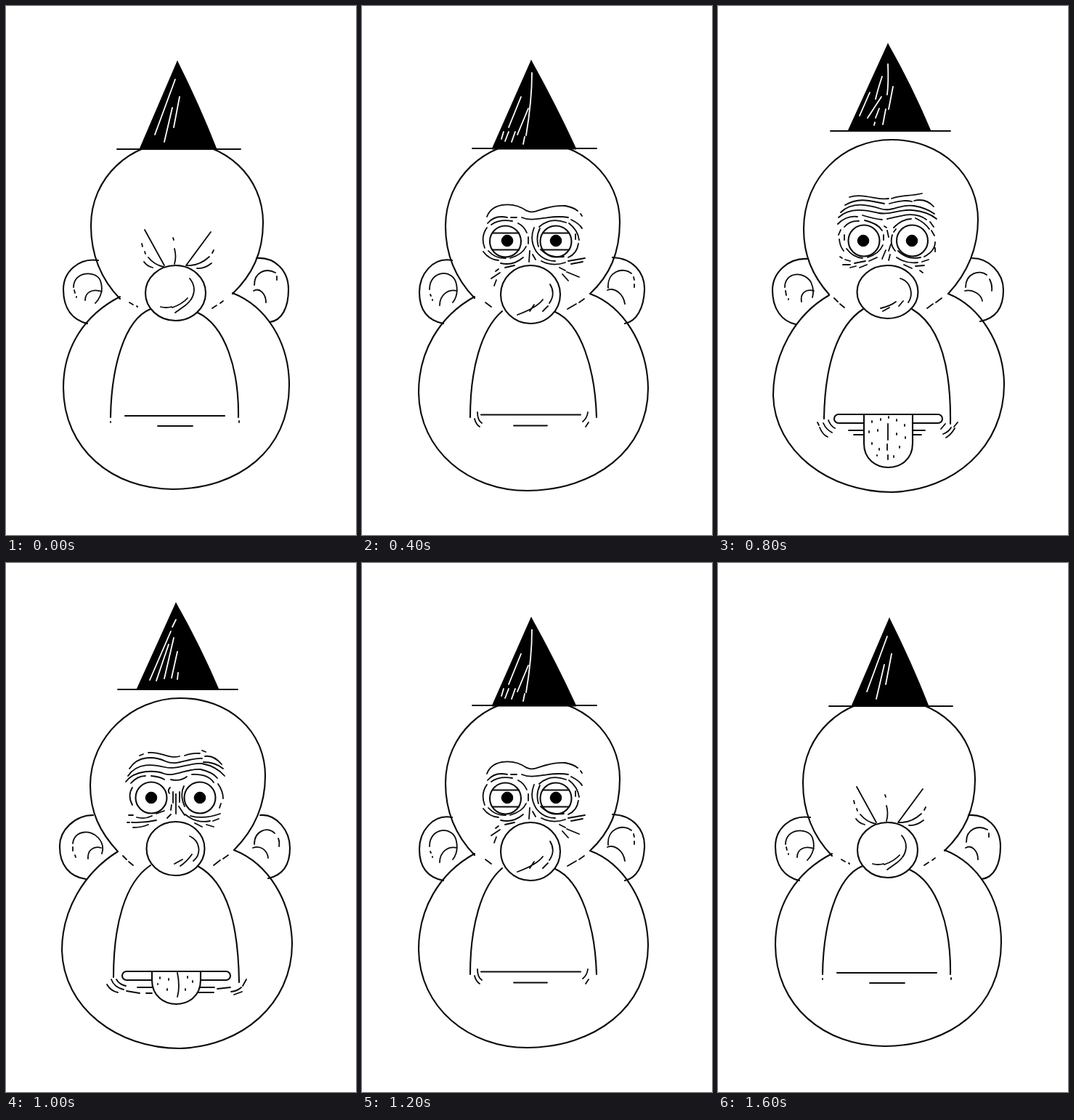
An HTML page for the animation above (1.9 s loop, 482 by 728 pixels).

```html
<!DOCTYPE html>
<html lang="en">
<head>
<meta charset="utf-8">
<title>Party hat</title>
<style>
  html, body { margin: 0; width: 100%; height: 100%; overflow: hidden; background: #fff; }
  svg { display: block; width: 482px; height: 728px; }
  path { fill: none; stroke: #0a0a0a; stroke-width: 2.1; stroke-linecap: round; stroke-linejoin: round; }
  .fine { stroke-width: 1.8; }
  .ink { fill: #000; stroke: #000; stroke-width: 1; }
  .skin { fill: #fff; }
  .shine { stroke: #fff; stroke-width: 1.8; }
</style>
</head>
<body>
<svg id="stage" viewBox="0 0 482 728"></svg>
<script>
const oval = (x, y, rx, ry = rx) =>
  `M${x - rx} ${y}a${rx} ${ry} 0 1 0 ${2 * rx} 0a${rx} ${ry} 0 1 0 ${-2 * rx} 0`;

// Outlines share one structure per part, so neighbouring poses can be blended.
const poses = [
  {
    hat: 'M236 76L184 197L290 197Q267 138 236 76',
    brim: 'M153 197L323 197',
    head: 'M157 403C128 373 117 338 117 302C117 237 170 187 236 187C302 187 354 235 354 298C354 340 339 370 312 396',
    body: 'M157 400C108 425 79 470 79 525C79 610 147 665 230 665C320 664 390 612 390 522C390 462 358 413 312 395',
    ears: 'M127 350C100 346 79 366 79 390C79 417 92 432 112 437M345 347C370 345 389 364 389 390C389 415 380 433 363 435',
    jaw: 'M199 417C162 432 145 500 144 566M264 422C302 440 321 500 320 566',
    nose: oval(233.5, 395, 41.5, 38),
    eyes: oval(197.5, 324, 21.5) + oval(267, 324, 21.5)
  },
  {
    hat: 'M233 75L179 197L295 197Q267 136 233 75',
    brim: 'M152 196L323 196',
    head: 'M155 402C127 373 115 338 115 303C115 238 168 187 235 187C303 187 355 235 355 297C355 340 341 371 314 396',
    body: 'M155 400C106 427 78 476 78 532C79 612 147 667 228 667C320 666 394 612 394 526C393 466 360 413 314 396',
    ears: 'M124 350C97 345 79 370 79 394C79 420 92 433 112 437M345 346C372 347 390 366 389 391C388 416 378 434 362 437',
    jaw: 'M193 420C164 445 149 500 149 566M266 421C302 437 321 500 323 566',
    nose: oval(232, 397, 41, 40),
    eyes: oval(197.5, 324, 21.5) + oval(267, 324, 21.5)
  },
  {
    hat: 'M234 55L180 174L293 174Q267 113 234 55',
    brim: 'M154 174L319 174',
    head: 'M154 397C129 370 116 343 116 306C116 240 173 186 240 186C307 186 357 231 357 293C357 336 341 368 314 395',
    body: 'M154 397C106 427 77 479 77 533C79 612 153 668 239 668C324 666 394 607 394 524C393 466 362 414 314 395',
    ears: 'M120 347C95 347 73 368 74 391C74 416 88 432 110 435M350 347C373 345 391 369 391 392C391 416 380 430 361 434',
    jaw: 'M199 416C163 440 148 500 148 570M264 417C306 440 320 500 321 577',
    nose: oval(233.5, 393, 40, 37),
    eyes: oval(200, 323, 21.5) + oval(267, 323, 21.5)
  },
  {
    hat: 'M234 52L179 172L293 172Q267 110 234 52',
    brim: 'M155 172L320 172',
    head: 'M153 397C130 371 118 343 118 307C118 238 171 184 239 184C307 184 358 232 358 294C358 337 342 369 317 396',
    body: 'M153 398C106 425 76 479 76 536C78 613 153 669 239 669C324 667 395 607 394 519C393 466 362 414 317 396',
    ears: 'M124 348C97 346 75 367 75 391C75 417 88 434 107 438M350 347C373 347 393 367 393 391C393 416 382 430 361 434',
    jaw: 'M200 417C164 440 147 496 146 568M267 417C308 441 321 504 320 575',
    nose: oval(233.5, 393.5, 42, 36.5),
    eyes: oval(201, 323, 21.5) + oval(267.5, 323, 21.5)
  }
];

// Hand-drawn marks, switched rather than blended.
const shine = [
  'M233 101L205 177M239 125L231 167M229 140L218 187',
  'M234 92Q234 130 226 178M219 125L202 167M229 141L214 177M195 173L192 183M202 173L197 186M211 173L206 187M224 180L222 190',
  'M234 78L229 88M227 94L198 161M224 112L207 162M231 103L218 159M236 122L228 158M237 151L236 160',
  'M234 80Q235 105 233 122M226 97Q220 115 217 128M209 119L195 151M225 125L206 154M241 111L235 142M222 141L217 154M231 142L227 163M216 160L215 164'
];
const earMarks = [
  'M93 387C93 365 124 363 130 378Q136 395 123 409M94 391L95 395M97 400V401M109 405C109 393 120 389 132 393M342 384C342 366 358 360 371 367M373 372V377M341 392C349 387 358 396 358 408',
  'M93 390C93 363 126 361 130 383Q133 398 125 408M94 397L95 399M97 404V405M107 412C107 398 118 389 131 392M339 388C337 366 359 358 371 368M374 373L375 377M375 383V387M338 391C348 387 360 396 362 410',
  'M92 386C94 368 116 366 127 378Q136 388 132 400M92 391V396M95 402L96 405M113 407C112 395 121 389 131 392M342 387C342 368 361 362 370 372M375 379Q377 383 376 390M340 392C350 388 360 395 361 406',
  'M92 387C92 366 118 364 128 380Q133 391 130 401M93 392L94 398M97 403V404M115 407C113 395 121 389 132 392M341 387C341 368 360 362 370 370M374 376Q378 383 377 392M340 392C350 389 363 397 364 406'
];
const noseMarks = [
  'M253 375C263 387 260 402 247 412L233 422M250 402Q243 410 229 415M213 414Q220 416 228 414M181 414L180 413M170 408L175 411M299 406L295 409M290 412L284 416',
  'M259 383Q267 396 258 409M256 413L249 420M249 404Q241 415 214 425M237 411L231 420M170 408L178 414M306 403L299 408M295 410L283 417',
  'M253 376C267 382 270 400 258 410M256 401Q249 411 240 417M243 408L232 414M161 403L166 408M169 411L175 416M306 402L299 407M295 409L286 416',
  'M251 375C265 379 270 396 262 408M255 406L249 413M245 407Q237 413 224 416M236 415L227 420M160 402L165 407M168 410L174 415M308 402L300 408M296 410L288 416'
];
const scowl =
  'M191 308L218 357M282 311L248 357M230 319L231 322M232 334Q235 345 232 355' +
  'M187 327L188 331M191 338L192 341M196 346Q204 356 217 359M190 352Q194 358 202 360' +
  'M249 357Q266 358 280 345M284 340L286 336M263 361Q273 362 283 354';
const weary =
  'M172 290C180 269 210 270 227 282M228 282C238 288 252 273 280 275Q291 277 297 282M301 286L303 289' +
  'M173 299Q183 287 200 291M205 291H213M220 291C238 299 257 286 284 291M288 294Q300 300 303 306' +
  'M178 301Q189 293 207 296M215 299Q223 303 227 312M244 304Q259 290 281 298M285 299Q297 308 299 322' +
  'M172 305Q163 318 169 333M167 338Q175 349 188 350M174 337Q184 348 198 347M204 347Q221 342 226 331M229 318V327' +
  'M237 305Q230 322 240 338M245 306Q239 318 243 331M298 327Q296 341 284 346M294 314V321' +
  'M191 354Q208 358 222 346M197 360L210 357M188 362L184 365M190 367L178 375M185 377L182 385M231 337L230 352M235 342L239 349' +
  'M240 338Q250 351 266 351M246 335Q258 347 278 345M247 351Q262 359 280 353M284 351L307 347M288 355L304 352M272 360L280 364M282 366L299 373M276 369L284 378';
const startled =
  'M184 265L189 263M196 261C213 259 223 270 239 266M246 265Q257 261 267 262M270 258L275 260M274 266Q286 264 297 277' +
  'M170 283C182 264 205 266 220 273S250 268 270 269M272 274Q288 274 299 283' +
  'M168 293C181 274 203 277 219 281S251 275 270 276Q290 280 301 293' +
  'M165 301C178 284 205 285 218 290S251 282 268 284Q285 288 291 296' +
  'M172 303Q181 293 192 293M200 293Q212 294 218 298M227 298Q240 301 249 294M256 291Q278 290 286 302' +
  'M174 309Q167 320 174 333M292 304Q299 314 299 324M296 331L294 337M226 309Q222 313 225 317M230 315V330M234 318V345M239 315V329' +
  'M245 307Q239 319 246 335M228 333L227 340M238 335L246 347M227 346L222 351M169 347H175M180 350Q191 353 201 348M207 345L218 341' +
  'M167 357H170M173 357Q190 358 207 354M175 364Q187 364 196 360M254 348Q273 353 295 345M247 346Q262 359 281 355M285 355L293 352M260 358L270 363M276 360L286 363';
const shocked =
  'M181 263C201 257 220 268 235 265M239 265C252 260 265 262 281 258M270 268Q286 264 297 276M175 274C195 262 212 269 229 272' +
  'M236 272Q255 266 267 269M169 284C185 268 208 274 224 279S250 272 270 275Q287 278 298 286' +
  'M166 291C183 275 208 282 222 285S251 279 268 281Q289 283 301 293' +
  'M165 300Q177 288 192 290M199 288Q215 293 226 294M233 293C249 290 270 281 287 294M292 297L297 304' +
  'M174 304Q182 295 194 296M202 295Q220 299 226 309M229 303L232 305M242 305Q254 293 266 293M272 292Q285 298 291 307' +
  'M169 308L166 315M167 321Q168 331 173 337M174 315V322M177 334Q186 346 199 347M206 346Q222 341 227 329M228 315V322' +
  'M233 309L235 318M240 315Q236 328 244 337M245 307L242 311M238 328L235 337M231 336L226 348M237 342L235 350' +
  'M248 337Q261 350 279 346M284 345Q299 337 299 325M294 309L298 316M168 345L171 347M175 349L182 351M172 356H182M188 354L203 351M208 351L219 346' +
  'M182 360L190 358M195 360L205 356M246 346Q259 355 275 353M281 352L290 349M256 356L267 361M272 358L284 357M278 364L282 367M299 333V338';

const chin = {
  tight: 'M209 578H257M144 572V573M321 571V573',
  slack: 'M209 577.500H255M159 559Q159 570 165 574M155 568Q157 576 162 579M311 559Q310 567 304 572M312 573L308 579',
  open: 'M152 573Q156 580 165 582M145 573Q149 584 162 587M139 580Q144 589 154 591M181 584H201M267 584H287M166 589L184 592M193 592H201M265 591H286M291 586L309 584M310 590Q319 589 324 584M314 594L325 590M331 573L326 582',
  wide: 'M152 570Q155 578 161 581M145 574Q149 583 157 587M140 580Q144 590 151 593M137 573L139 577M180 584H201M187 590H201M268 584H285M269 590H280M313 575L307 582M321 580Q318 586 310 589M326 581Q321 590 314 594M330 573L325 579'
};
const buds = {
  short: 'M236 564Q240 583 236 597M212 570V572M224 572V574M209 579V580M222 586V588M250 569V571M257 575V577M247 586V588',
  long: 'M235 565V567M234 575V597M233 603V611M234 618V624M212 571V573M224 568V570M208 585V587M220 583V585M212 601V603M222 609V611M246 569V571M257 576V578M246 588V590M258 593V595M250 606V608M242 619V621M219 618V619'
};

// One entry per drawing: blend position, marks, eyelid gap, mouth height and tongue tip.
const steps = [
  { at: 0, face: scowl, chin: 'tight' },
  { at: .25, face: scowl, chin: 'tight' },
  { at: .5, face: weary, chin: 'slack', lid: 8.5 },
  { at: .75, face: weary, chin: 'slack', lid: 10 },
  { at: 1, face: weary, chin: 'slack', lid: 11.5 },
  { at: 1.5, face: startled, chin: 'slack', lid: 17, mouth: 6 },
  { at: 2, face: startled, chin: 'open', lid: 21.5, mouth: 12, tip: 607, buds: 'short' },
  { at: 2.5, face: shocked, chin: 'wide', lid: 21.5, mouth: 12, tip: 624, buds: 'short', lift: 6 },
  { at: 3, face: shocked, chin: 'wide', lid: 21.5, mouth: 12, tip: 635, buds: 'long' }
];

const path = (d, cls = '') => `<path class="${cls}" d="${d}"/>`;

function blend(a, b, k) {
  const target = b.match(/-?[\d.]+/g);
  let i = 0;
  return a.replace(/-?[\d.]+/g, n => +n + (target[i++] - n) * k);
}

function lids(gap) {
  const half = Math.sqrt(21.5 ** 2 - gap ** 2);
  if (!half) return '';
  return path([198, 267].map(x =>
    [-gap, gap].map(dy => `M${x - half} ${324 + dy}h${2 * half}`).join('')).join(''));
}

function mouth(s) {
  if (!s.mouth) return path(`M164 ${564 - s.at * 1.5}H301`);
  const r = s.mouth / 2;
  let out = path(`M${160 + r} 562H${309 - r}a${r} ${r} 0 0 1 0 ${s.mouth}H${160 + r}a${r} ${r} 0 0 1 0 ${-s.mouth}`);
  if (s.tip) {
    const y = s.tip - 33;
    out += path(`M201 562V${y}C201 ${y + 44} 268 ${y + 44} 268 ${y}V562Z`, 'skin') +
      path(buds[s.buds], 'fine');
  }
  return out;
}

function draw(s) {
  const low = Math.floor(s.at), key = Math.round(s.at);
  const a = poses[low], b = poses[Math.min(3, low + 1)];
  const part = (name, cls) => path(blend(a[name], b[name], s.at - low), cls);
  const eyes = s.lid
    ? part('eyes') + path(oval(200, 323, 7.8) + oval(267, 323, 7.8), 'ink') + lids(s.lid)
    : '';
  return part('ears') + path(earMarks[key], 'fine') + part('body') + part('head') + part('jaw') +
    path(s.face, 'fine') + eyes +
    part('nose', 'skin') + path(noseMarks[key], 'fine') +
    path(chin[s.chin], 'fine') + mouth(s) +
    `<g transform="translate(0 ${-(s.lift || 0)})">` +
    part('hat', 'ink') + part('brim', 'fine') + path(shine[key], 'shine') + '</g>';
}

const stage = document.getElementById('stage');
const drawings = steps.map(draw);
let shown = -1;

function tick() {
  const beat = Math.min(16, Math.floor(performance.now() % 1900 / 100));
  const step = 8 - Math.abs(8 - beat);
  if (step !== shown) stage.innerHTML = drawings[shown = step];
  requestAnimationFrame(tick);
}
tick();
</script>
</body>
</html>
```
